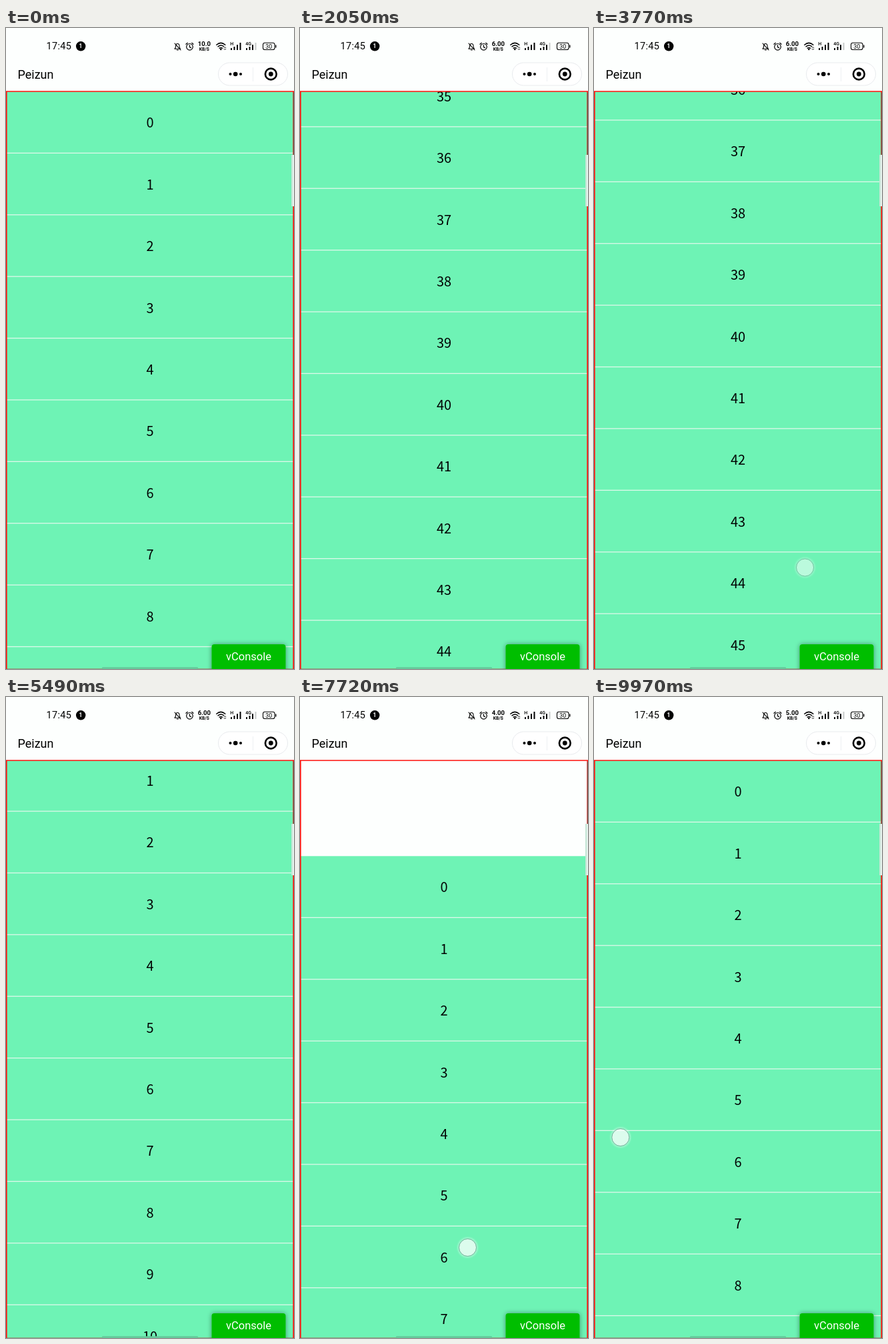
Recreate the animation shown at these times as an HTML page. Size 432 by 960 pixels, loop 10000 ms.

```html
<!DOCTYPE html>
<html lang="en">
<head>
<meta charset="utf-8">
<title>List scroll</title>
<style>
  html, body { margin: 0; width: 100%; height: 100%; overflow: hidden; background: #fdfffe; }
  svg { display: block; width: 432px; height: 960px; font-family: Roboto, sans-serif; }
  #rows text { font: 20px "Noto Sans CJK SC", "Noto Sans CJK JP", "Noto Sans", sans-serif; text-anchor: middle; }
  .line { fill: none; stroke: #000; stroke-linecap: round; stroke-linejoin: round; }
  .mid { text-anchor: middle; }
  .bold { font-weight: 700; }
</style>
</head>
<body>
<svg viewBox="0 0 432 960">
  <defs>
    <clipPath id="view"><rect x="1" y="95" width="430" height="865"/></clipPath>
    <filter id="shade" x="-20%" y="-50%" width="140%" height="200%">
      <feDropShadow dx="0" dy="0" stdDeviation="3.5" flood-color="#000" flood-opacity=".4"/>
    </filter>
    <radialGradient id="glow">
      <stop offset=".75" stop-color="#fff" stop-opacity=".4"/>
      <stop offset="1" stop-color="#fff" stop-opacity="0"/>
    </radialGradient>
  </defs>
  <rect width="432" height="960" fill="#fdfffe"/>

  <g clip-path="url(#view)">
    <rect id="fill" x="1" width="430" height="960" fill="#6ef3b5"/>
    <g id="rows"></g>
  </g>
  <path d="M.8 960V95H431.2V960" fill="none" stroke="#ff0f0a" stroke-width="1.6"/>
  <path d="M1 959.6H431" stroke="#a04a34" stroke-opacity=".6" stroke-width=".8"/>
  <path d="M431.5 97V190" stroke="#5c4b42"/>
  <rect x="428" y="190" width="4" height="77" fill="#c4e6d6"/>
  <path d="M431 190V267" stroke="#e6f2ec" stroke-width="2"/>
  <rect x="144" y="957.3" width="144" height="2.7" rx="1.3" fill="#64c99a"/>

  <g id="touch">
    <circle r="17" fill="url(#glow)"/>
    <circle r="13" fill="#fff" fill-opacity=".6" stroke="#4f8f7a" stroke-opacity=".7"/>
  </g>

  <rect x="308.5" y="923" width="111" height="45" rx="4" fill="#04be02" filter="url(#shade)"/>
  <text class="mid" x="364" y="947" font-size="16.5" fill="#fff">vConsole</text>

  <text x="17.5" y="75.6" font-size="18">Peizun</text>
  <rect x="318.5" y="52" width="104" height="34" rx="17" fill="#fff" stroke="#e9ebee"/>
  <path d="M370.5 59V80" stroke="#eff0f2"/>
  <circle cx="336.5" cy="69" r="2"/><circle cx="344.2" cy="69" r="3.3"/><circle cx="352" cy="69" r="2"/>
  <circle class="line" cx="397.3" cy="69" r="8.4" stroke-width="2.6"/><circle cx="397.3" cy="69" r="3.4"/>

  <text x="60.5" y="32.3" font-size="14.5" letter-spacing=".3">17:45</text>
  <circle cx="112.2" cy="27.3" r="7.2"/>
  <text class="mid bold" x="112" y="30.4" font-size="8.5" fill="#fff">1</text>
  <path class="line" d="M253 31.2H261.5Q260 30 260 26.8Q260 23.5 257.3 23.5T254.6 27Q254.6 30 253 31.2M256.3 33H258.4M253 23L262 33" stroke-width="1.1"/>
  <g class="line" stroke-width="1.2">
    <circle cx="275.5" cy="28.3" r="4.8"/>
    <path d="M275.5 25.7V28.6L277.4 29.6M270 24.3L272.3 22.3M281 24.3L278.7 22.3"/>
  </g>
  <text id="speed" class="mid bold" x="297.3" y="26.9" font-size="9.6"></text>
  <text class="mid bold" x="297.3" y="34.2" font-size="6.6">KB/S</text>
  <g class="line" stroke-width="1.5">
    <path d="M315.8 25.2Q322.3 19.6 328.8 25.2M318 27.8Q322.3 24.2 326.5 27.6M320.2 30.2Q322.3 28.6 324.4 30.2"/>
    <path d="M327.2 29.6L328.4 28.4L329.6 29.6M327.2 31.4L328.4 32.6L329.6 31.4" stroke-width="1"/>
  </g>
  <circle cx="322.3" cy="32" r="1.3"/>
  <text x="336.2" y="26.4" font-size="7" font-weight="500">H</text>
  <text x="359.2" y="26.4" font-size="7" font-weight="500">4G</text>
  <g id="bars"></g>
  <rect class="line" x="385.5" y="22.3" width="17.5" height="10.2" rx="2.8" stroke-width="1.1"/>
  <path class="line" d="M404.8 26V29" stroke-width="1.3"/>
  <text class="mid" x="394.3" y="30.6" font-size="8.8">30</text>
</svg>
<script>
const LOOP = 10000, PITCH = 92.4, TOP = 95.3, POOL = 11;
const $ = id => document.getElementById(id);

function add(parent, tag, attrs) {
  const el = document.createElementNS("http://www.w3.org/2000/svg", tag);
  for (const k in attrs) el.setAttribute(k, attrs[k]);
  return parent.appendChild(el);
}

const ease = {
  lin: p => p,
  in: p => p * p,
  out: p => 1 - (1 - p) ** 2,
  out3: p => 1 - (1 - p) ** 3
};

// time, scroll offset, easing into it
const scroll = [
  [0, 0], [250, 0], [430, 300, "in"], [800, 1050, "out"],
  [960, 1350, "lin"], [1300, 2250, "out"], [1450, 2550, "lin"],
  [3450, 3650, "out3"], [3760, 3375.8, "out"], [3790, 3375.8],
  [4450, 1900, "out"], [4620, 1600, "lin"], [5798, 0, "out"],
  [6350, 0], [6640, -57, "out"], [6670, -57], [7000, 0, "out3"],
  [7300, 0], [7720, -143, "out"], [7850, -143], [8250, 0, "out3"],
  [LOOP, 0]
];

// start, end, x0, y0, x1, y1, opacity, easing, lift time
const swipes = [
  [250, 430, 305, 810, 318, 510, .9, "in", 440],
  [800, 960, 308, 815, 322, 515, .9, "lin", 970],
  [1300, 1450, 308, 812, 324, 512, .9, "lin", 1460],
  [3450, 3760, 300, 534, 316.5, 808, .7, "out", 3800],
  [4450, 4620, 304, 530, 318, 830, .8, "lin", 4640],
  [6350, 6640, 340, 690, 355.3, 835, .65, "out", 6670],
  [7300, 7720, 270, 480, 251.5, 824.5, 1, "out", 7850],
  [9600, 9800, 40, 668, 39.8, 659.5, 1, "out", LOOP]
];

const speeds = [[0, "10.0"], [1500, "6.00"], [5600, "4.00"], [9400, "5.00"]];

const rows = Array.from({ length: POOL }, () => {
  const g = add($("rows"), "g", {});
  add(g, "rect", { x: 1, y: 91.4, width: 430, height: 1.3, fill: "#dcf8e9" });
  return { g, label: add(g, "text", { x: 216, y: 54 }) };
});

for (const x of [337, 360]) {
  for (let i = 0; i < 4; i++) {
    const h = [3, 5, 8, 11][i];
    add($("bars"), "rect", {
      x: x + i * 4.5, y: 33 - h, width: 2, height: h, rx: .6,
      fill: x === 360 && i === 3 ? "#c8cbca" : "#000"
    });
  }
}

function offsetAt(t) {
  const i = Math.max(1, scroll.findIndex(k => k[0] > t));
  const [t0, a] = scroll[i - 1], [t1, b, e = "lin"] = scroll[i];
  return a + (b - a) * ease[e]((t - t0) / (t1 - t0));
}

function draw(t) {
  const s = offsetAt(t);
  $("fill").setAttribute("y", Math.max(TOP, TOP - s));
  const first = Math.max(0, Math.floor(s / PITCH));
  rows.forEach(({ g, label }, i) => {
    const n = first + i;
    g.setAttribute("transform", `translate(0 ${TOP + n * PITCH - s})`);
    label.textContent = n;
  });

  const w = swipes.find(k => t >= k[0] && t < k[8]);
  $("touch").setAttribute("opacity", w ? w[6] : 0);
  if (w) {
    const [t0, t1, x0, y0, x1, y1, , e] = w;
    const p = ease[e](Math.min(1, (t - t0) / (t1 - t0)));
    $("touch").setAttribute("transform", `translate(${x0 + (x1 - x0) * p} ${y0 + (y1 - y0) * p})`);
  }
  $("speed").textContent = speeds.filter(k => k[0] <= t).pop()[1];
}

const start = performance.now();
function tick() {
  draw((performance.now() - start) % LOOP);
  requestAnimationFrame(tick);
}
tick();
</script>
</body>
</html>
```
